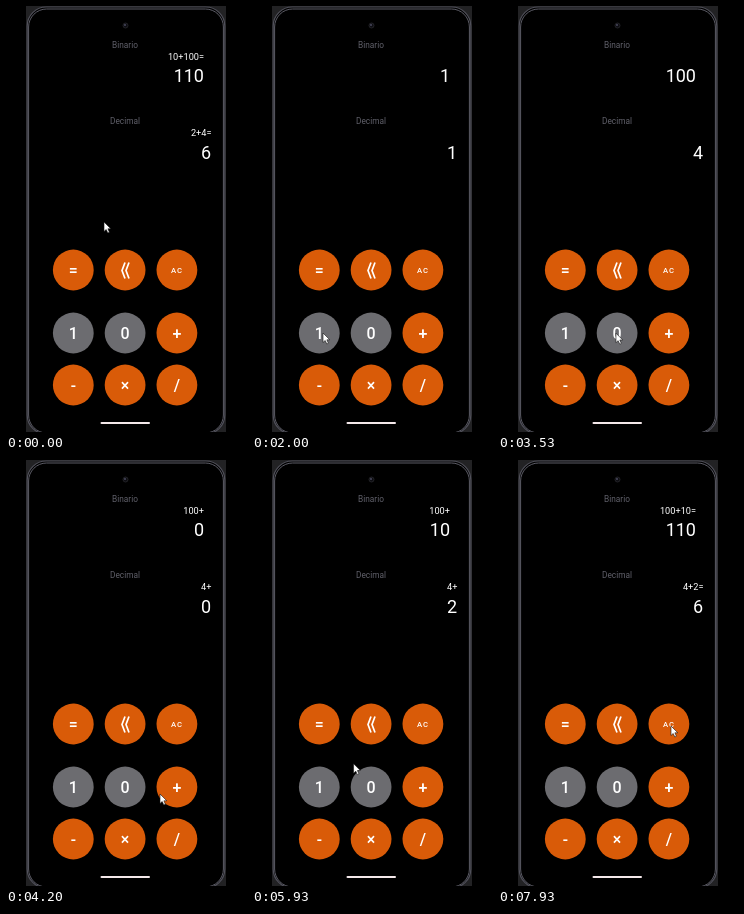
Write an HTML page that moves like this. It is 240 px wide and 426 px high and loops after 8 s.

```html
<!DOCTYPE html>
<html lang="es">
<head>
<meta charset="utf-8">
<title>Calculadora binaria</title>
<style>
  html, body { margin: 0; width: 100%; height: 100%; overflow: hidden; background: #000; }
  svg { display: block; width: 100%; height: 100%; }
  text { font-family: Roboto, sans-serif; fill: #fff; }
  .label { font-size: 8.3px; fill: #60606a; text-anchor: middle; }
  .sum { font-size: 9.2px; text-anchor: end; }
  .value { font-size: 18px; text-anchor: end; }
  .key { font-size: 16px; font-weight: 500; text-anchor: middle; }
  .small { font-size: 7.7px; letter-spacing: .8px; }
</style>
</head>
<body>
<svg viewBox="0 0 240 426">
  <rect width="240" height="426" fill="#000"/>
  <rect x="20" width="200" height="426" fill="#222224"/>
  <rect x="21.2" y="1" width="197.6" height="427" rx="19" fill="#000" stroke="#50505a" stroke-width="1.2"/>
  <rect x="22.6" y="3" width="194.8" height="424" rx="18" fill="#000" stroke="#5c5c66"/>
  <circle cx="119.5" cy="19.5" r="2.5" fill="#0d0d12" stroke="#29292e" stroke-width=".8"/>
  <circle cx="119" cy="19" r=".9" fill="#505068"/>

  <text class="label" x="119" y="42">Binario</text>
  <text class="sum" x="198" y="53.7"></text>
  <text class="value" x="198" y="76"></text>
  <text class="label" x="119" y="118.3">Decimal</text>
  <text class="sum" x="205.5" y="130.3"></text>
  <text class="value" x="205" y="152.5"></text>

  <g id="keys"></g>
  <path d="M119 256.5l-3 8 3 8M123 256.5l-3 8 3 8" fill="none" stroke="#fff" stroke-width="1.7"/>
  <rect x="94.5" y="416" width="49.5" height="2" rx="1" fill="#f4e8ea"/>
  <path id="cursor" d="M0 0V9.5L2.2 7.5L3.8 11L5.4 10.2L3.9 6.8H6.8Z" fill="#fff" stroke="#111" stroke-width=".6"/>
</svg>
<script>
const LOOP = 8000, STEP = 200 / 3, TAP_DELAY = 60, TAP_GAP = 330;
const keyRows = [[264, '=', '', 'AC'], [327, '1', '0', '+'], [379, '-', '×', '/']];

// Where the pointer rests, and the keys tapped there.
const stops = [
  { arrive: 0, leave: 400, x: 98, y: 216, taps: '' },
  { arrive: 1710, leave: 2540, x: 71, y: 327, taps: '1' },
  { arrive: 3000, leave: 3500, x: 117, y: 327, taps: '00' },
  { arrive: 3850, leave: 4200, x: 154, y: 334, taps: '+' },
  { arrive: 4600, leave: 4760, x: 74, y: 329, taps: '1' },
  { arrive: 5130, leave: 5550, x: 130, y: 328, taps: '0' },
  { arrive: 6300, leave: 6800, x: 75, y: 281, taps: '=' },
  { arrive: 7800, leave: LOOP, x: 173, y: 266, taps: '' }
];

document.getElementById('keys').innerHTML = keyRows.map(([y, ...names]) =>
  names.map((name, i) => {
    const x = 67.3 + 51.8 * i, small = name.length > 1;
    const color = /[01]/.test(name) ? '#6c6c70' : '#d95b08';
    return `<circle cx="${x}" cy="${y}" r="20.4" fill="${color}"/>
      <text class="key ${small ? 'small' : ''}" x="${x}" y="${y + (small ? 2.8 : 5.7)}">${name}</text>`;
  }).join('')).join('');

const fields = document.querySelectorAll('.sum, .value');
const cursor = document.getElementById('cursor');
const toDecimal = text => text.replace(/[01]+/g, bits => parseInt(bits, 2));

function press({ sum, value }, key) {
  if (key === '+') return { sum: value + '+', value: '0' };
  if (key === '=') {
    const total = parseInt(sum, 2) + parseInt(value, 2);
    return { sum: sum + value + '=', value: total.toString(2) };
  }
  const done = sum.endsWith('=');
  return { sum: done ? '' : sum, value: done || value === '0' ? key : value + key };
}

function displayAt(t) {
  let state = { sum: '10+100=', value: '110' };
  for (const { arrive, taps } of stops)
    [...taps].forEach((key, i) => {
      if (t >= arrive + TAP_DELAY + i * TAP_GAP) state = press(state, key);
    });
  return [state.sum, state.value, toDecimal(state.sum), toDecimal(state.value)];
}

function pointerAt(t) {
  const i = stops.findLastIndex(stop => stop.arrive <= t);
  const from = stops[i], to = stops[i + 1] || from;
  const u = t > from.leave ? (t - from.leave) / (to.arrive - from.leave) : 0;
  const k = u * u * (3 - 2 * u);
  return [from.x + (to.x - from.x) * k, from.y + (to.y - from.y) * k];
}

function draw(now) {
  // The picture advances 15 times per second; the offset absorbs 10 ms rounding.
  const t = Math.floor((now % LOOP + 5) / STEP) * STEP;
  displayAt(t).forEach((text, i) => fields[i].textContent = text);
  cursor.setAttribute('transform', `translate(${pointerAt(t)})`);
}

const start = performance.now();
function tick() {
  draw(performance.now() - start);
  requestAnimationFrame(tick);
}
tick();
</script>
</body>
</html>
```
